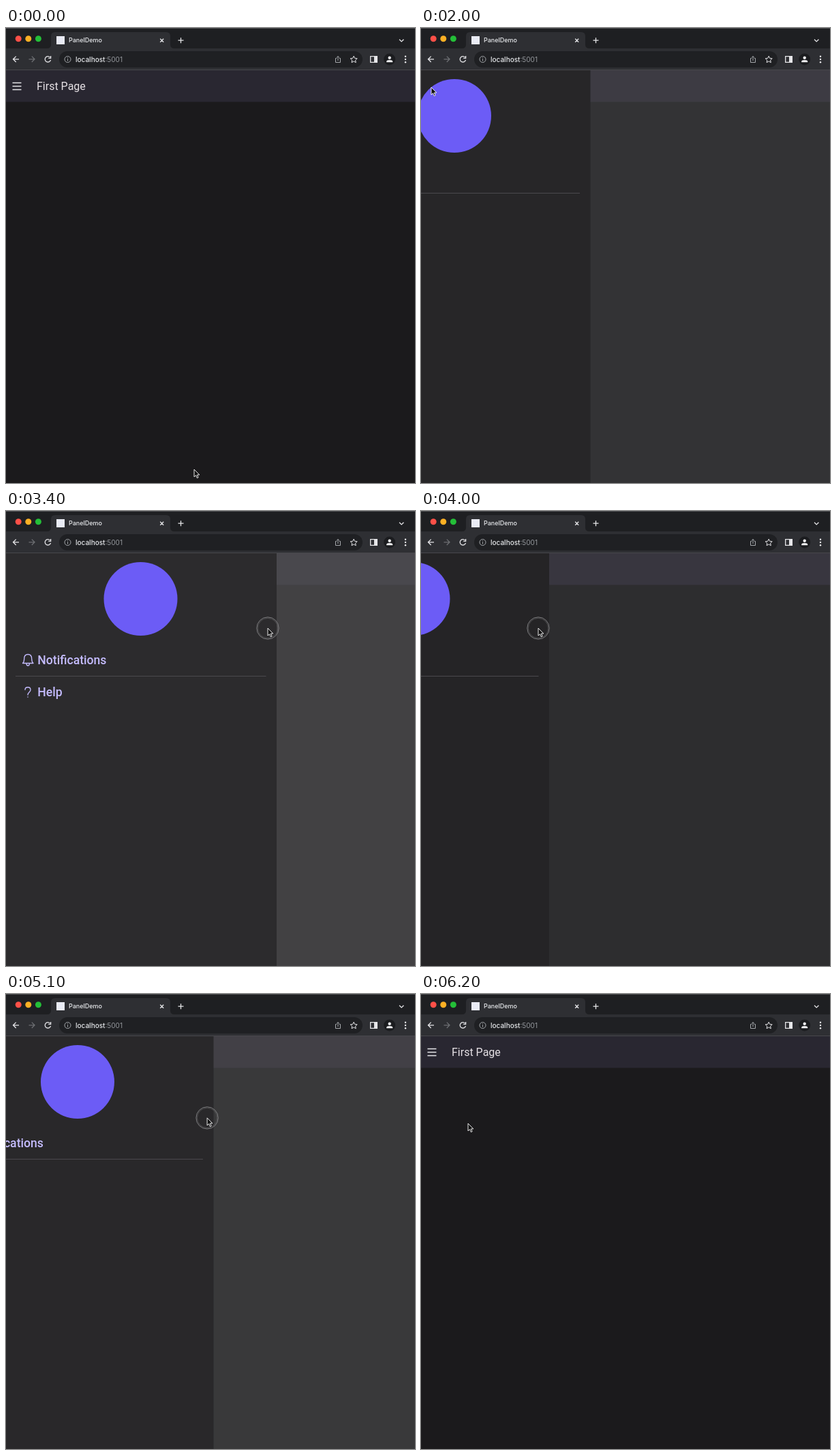
An HTML page for the animation above (6900 ms loop, 600x668 px).

```html
<!DOCTYPE html>
<html lang="en">
<head>
<meta charset="utf-8">
<title>Navigation drawer</title>
<style>
  html, body { margin: 0; height: 100%; overflow: hidden; background: #1b1a1c; }
  svg { display: block; width: 600px; height: 668px; }
  text { font-family: Roboto, sans-serif; }
  .ui { font-family: Inter, sans-serif; font-weight: 500; }
  .line { fill: none; stroke: #e6e6e9; stroke-width: 1.3; }
  .accent { fill: none; stroke: #c5bcff; stroke-width: 1.3; stroke-linecap: round; stroke-linejoin: round; }
  .menu { fill: #c5bcff; font-size: 17.6px; font-weight: 500; }
</style>
</head>
<body>
<svg viewBox="0 0 600 668">
  <!-- page -->
  <rect width="600" height="668" fill="#1b1a1c"/>
  <rect y="62" width="600" height="46.5" fill="#292731"/>
  <path class="line" d="M9.5 80.5h13m-13 5h13m-13 5h13"/>
  <text x="45" y="91" font-size="16" fill="#e6e1e5">First Page</text>
  <rect id="scrim" y="62" width="600" height="606" fill="#666668"/>

  <!-- drawer -->
  <g id="drawer">
    <rect id="panel" y="62" width="397" height="606"/>
    <circle cx="197.5" cy="129" r="54" fill="#6c5cf6"/>
    <path class="accent" d="M24.5 223.5h15.5q-2.3-2-2.3-6.5c0-4-2-6.5-5.5-6.5s-5.5 2.5-5.5 6.5q0 4.5-2.2 6.5zm5.5.5q0 3 2.2 3t2.2-3"/>
    <text class="menu" x="46.3" y="224.5">Notifications</text>
    <path d="M14 242.5h367.5" stroke="#4b494e"/>
    <path class="accent" d="M28 262.5c0-5 8-5 8 0 0 3.5-4 3.5-4 7.5m0 2.8v.4"/>
    <text class="menu" x="46.3" y="272">Help</text>
  </g>

  <!-- browser window -->
  <rect width="600" height="62" fill="#1e1f22"/>
  <path d="M0 .5h600" stroke="#4d4e51"/>
  <path d="M0 30h60q6 0 6-6V12q0-6 6-6h163q6 0 6 6v12q0 6 6 6h353v32H0z" fill="#2e2f33"/>
  <path d="M0 61.5h600" stroke="#48484c"/>
  <circle cx="18.2" cy="15.8" r="4.5" fill="#fe5048"/>
  <circle cx="32.8" cy="15.8" r="4.5" fill="#fdb024"/>
  <circle cx="47.4" cy="15.8" r="4.5" fill="#24bf38"/>
  <rect x="74" y="12" width="12" height="12" fill="#e9ebf5"/>
  <text class="ui" x="92" y="21.3" font-size="9" fill="#e8eaed">PanelDemo</text>
  <path class="line" d="M226.2 15.7l5 5m0-5l-5 5M252.5 18.2h8m-4-4v8M577 16.7l3.2 3.2 3.2-3.2"/>
  <rect x="78" y="34" width="445" height="24" rx="12" fill="#1f2023"/>
  <path class="line" d="M19 45.8h-8.5m4.2-4.2l-4.2 4.2 4.2 4.2"/>
  <path class="line" d="M33.5 45.8h8.5m-4.2-4.2l4.2 4.2-4.2 4.2" style="stroke:#6d6f73"/>
  <path class="line" d="M64.5 42.9a4.2 4.2 0 1 0 1 3.9M65.6 41v3.3h-3.4"/>
  <g class="line" style="stroke:#a4a7ab;stroke-width:1">
    <circle cx="90.5" cy="46" r="4.5"/>
    <path d="M90.5 45.3v3.2m0-5.3v1"/>
    <path d="M485 44.5h-1.5v6h7v-6H489M487 48v-6.5m-2 2l2-2 2 2"/>
  </g>
  <text class="ui" x="102" y="49.6" font-size="10" fill="#e8eaed">localhost<tspan fill="#95989d" font-weight="400">:5001</tspan></text>
  <path class="line" style="stroke-width:1" d="M510.2 41.2l1.5 3.2 3.5.4-2.6 2.4.7 3.5-3.1-1.8-3.1 1.8.7-3.5-2.6-2.4 3.5-.4z"/>
  <path class="line" d="M534.7 41.7h9.6v8.6h-9.6z"/>
  <path d="M540 41h5v10h-5z" fill="#e6e6e9"/>
  <circle cx="562.7" cy="46" r="8.5" fill="#1b1c1f"/>
  <g fill="#f1f1f3">
    <circle cx="562.7" cy="43.7" r="2.2"/>
    <path d="M558.2 50.3v-1q0-2.3 4.5-2.3t4.5 2.3v1z"/>
    <circle cx="586" cy="41.8" r="1.2"/>
    <circle cx="586" cy="46" r="1.2"/>
    <circle cx="586" cy="50.2" r="1.2"/>
  </g>

  <!-- pointer, origin at its tip -->
  <g id="pointer">
    <g id="press" fill="none">
      <circle r="16.2" stroke="#858587" stroke-width=".9"/>
      <circle r="14.7" stroke="#606062" stroke-width=".7"/>
    </g>
    <path id="arrow" d="M0 0v11l2.6-2.3 1.7 4 1.8-.8L4.4 8h3.4z" fill="#111" stroke="#fff" stroke-width=".9"/>
    <path id="hand" d="M-1 1.2a1 1 0 0 1 2 0v3.3l3.5.8q1.5.4 1.2 2L5 11H0l-3.5-4.4q.3-1.4 1.6-.6l.9.8z" fill="#fff" stroke="#111" stroke-width=".7"/>
  </g>
</svg>
<script>
const LOOP = 6900, STEP = 100, WIDTH = 397;

// Keys: [time, value, ...]
const pointerKeys = [
  [0, 276, 648], [750, 18, 91], [1000, 15, 87], [2300, 15, 87],
  [3000, 384, 172], [3400, 384, 172], [4000, 172, 172], [4300, 105, 173],
  [4700, 212, 174], [5400, 349, 187], [6000, 69, 190]
];
const edgeKeys = [
  [1900, 0], [2000, 248.5], [2100, WIDTH], [3400, WIDTH], [4000, 188],
  [4300, 118], [4700, 212], [5400, 364.5], [5900, 92], [6050, 0]
];

const el = id => document.getElementById(id);
const show = (id, on) => { el(id).style.display = on ? '' : 'none'; };

function sample(keys, t) {
  const next = keys.findIndex(k => k[0] > t);
  if (next < 0) return keys[keys.length - 1].slice(1);
  if (next === 0) return keys[0].slice(1);
  const a = keys[next - 1], b = keys[next];
  const p = (t - a[0]) / (b[0] - a[0]);
  const eased = p * p * (3 - 2 * p);
  return a.slice(1).map((v, i) => v + (b[i + 1] - v) * eased);
}

function draw() {
  // Steps of a tenth of a second, with a small lead for paint delay
  const t = Math.floor(performance.now() / STEP + 0.2) * STEP % LOOP;
  const [x, y] = sample(pointerKeys, t);
  const [edge] = sample(edgeKeys, t);
  const open = edge / WIDTH;
  const grey = Math.round(30 + 13 * open);
  const hand = t >= 700 && t < 1900;

  el('drawer').setAttribute('transform', `translate(${edge - WIDTH} 0)`);
  el('panel').setAttribute('fill', `rgb(${grey + 1},${grey},${grey + 2})`);
  el('scrim').setAttribute('opacity', 0.52 * open);
  el('pointer').setAttribute('transform', `translate(${x} ${y})`);
  show('hand', hand);
  show('arrow', !hand);
  show('press', t >= 3400 && t < 5900);
  requestAnimationFrame(draw);
}
draw();
</script>
</body>
</html>
```
